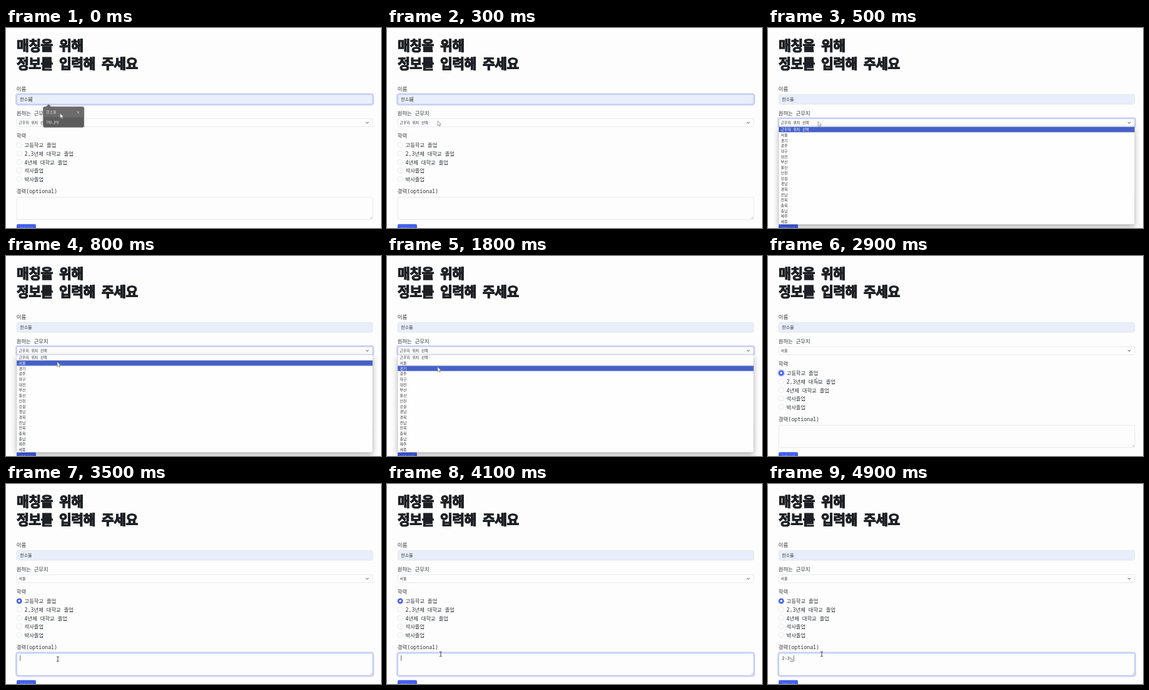
An HTML page for the animation above (5 s loop, 600 px wide and 321 px high).

```html
<!DOCTYPE html>
<html lang="ko">
<head>
<meta charset="utf-8">
<title>매칭 정보 입력</title>
<style>
  html, body { margin: 0; width: 100%; height: 100%; overflow: hidden; background: #fdfdfd; }
  svg { display: block; width: 100vw; height: 100vh; }
  text { font-family: "Noto Sans Mono", "Noto Sans CJK KR", "Noto Sans CJK", sans-serif; font-size: 8.3px; fill: #2f3337; white-space: pre; }
  .title { font: 900 21.6px "Noto Sans CJK KR", "Noto Sans CJK", sans-serif; letter-spacing: -.6px; word-spacing: 4.7px; fill: #1d2024; stroke: #1d2024; stroke-width: 1.2; }
  .mid { font-size: 7px; }
  .small { font-size: 5.9px; }
  .tip text { font: 5.8px "Noto Sans CJK KR", "Noto Sans CJK", sans-serif; fill: #dedede; }
  .field { fill: #fdfdfd; stroke: #e1e4e8; stroke-width: .8; }
  .auto { fill: #e8eefa; }
  .line { fill: none; stroke: #343a40; stroke-width: .9; }
  .ring { fill: none; stroke: #d0d8f8; stroke-width: 2.2; }
  .edge { fill: none; stroke: #adbbf2; stroke-width: .8; }
  .caret { stroke: #333; stroke-width: .7; }
  .list { fill: #fefefe; stroke: #cfd2d6; stroke-width: .5; filter: drop-shadow(0 4px 5px rgba(0, 0, 0, .3)); }

  /* Everything shares one 5 s clock; 2% is one 100 ms step. */
  .a { animation: 5s step-end infinite; }
  .tip { animation-name: tip; }
  .nameFocus { animation-name: nameFocus; }
  .menu { animation-name: menu; }
  .bar { animation-name: bar; fill: #4661c6; }
  .row0 { animation-name: row0; }
  .row1 { animation-name: row1; }
  .row2 { animation-name: row2; }
  .hint { animation-name: hint; }
  .city { animation-name: city; }
  .placeFocus { animation-name: placeFocus; }
  .checked { animation-name: checked; }
  .radioFocus { animation-name: radioFocus; }
  .noteFocus { animation-name: noteFocus; }
  .k1 { animation-name: k1; }
  .k2 { animation-name: k2; }
  .k3 { animation-name: k3; }
  .k4 { animation-name: k4; }
  .noteCaret { animation-name: noteCaret; }
  .arrow { animation-name: arrow; }
  .beam { animation-name: beam; }

  @keyframes tip { 0% { opacity: 1 } 2%, 100% { opacity: 0 } }
  @keyframes nameFocus { 0% { opacity: 1 } 8%, 100% { opacity: 0 } }
  @keyframes menu { 0% { opacity: 0 } 8% { opacity: 1 } 44%, 100% { opacity: 0 } }
  @keyframes bar {
    0% { transform: none } 16% { transform: translateY(8.7px) } 20% { transform: translateY(17.4px) }
    28% { transform: translateY(8.7px) } 36% { transform: translateY(17.4px) } 38%, 100% { transform: translateY(8.7px) }
  }
  @keyframes row0 { 0% { fill: #fff } 16%, 100% { fill: #2f3337 } }
  @keyframes row1 { 0% { fill: #2f3337 } 16% { fill: #fff } 20% { fill: #2f3337 } 28% { fill: #fff } 36% { fill: #2f3337 } 38%, 100% { fill: #fff } }
  @keyframes row2 { 0% { fill: #2f3337 } 20% { fill: #fff } 28% { fill: #2f3337 } 36% { fill: #fff } 38%, 100% { fill: #2f3337 } }
  @keyframes hint { 0% { opacity: 1 } 44%, 100% { opacity: 0 } }
  @keyframes city { 0% { opacity: 0 } 44%, 100% { opacity: 1 } }
  @keyframes placeFocus { 0% { opacity: 0 } 8% { opacity: 1 } 56%, 100% { opacity: 0 } }
  @keyframes checked { 0% { opacity: 0 } 56%, 100% { opacity: 1 } }
  @keyframes radioFocus { 0% { opacity: 0 } 56% { opacity: 1 } 68%, 100% { opacity: 0 } }
  @keyframes noteFocus { 0% { opacity: 0 } 68%, 100% { opacity: 1 } }
  @keyframes k1 { 0% { opacity: 0 } 86%, 100% { opacity: 1 } }
  @keyframes k2 { 0% { opacity: 0 } 90%, 100% { opacity: 1 } }
  @keyframes k3 { 0% { opacity: 0 } 92%, 100% { opacity: 1 } }
  @keyframes k4 { 0% { opacity: 0 } 96%, 100% { opacity: 1 } }
  @keyframes noteCaret {
    0% { transform: none } 86% { transform: translateX(4.2px) } 90% { transform: translateX(8.4px) }
    92% { transform: translateX(12.6px) } 96%, 100% { transform: translateX(18.6px) }
  }
  @keyframes arrow {
    0% { transform: translate(86.5px, 137px) }
    2% { transform: translate(86px, 139px) }
    4% { transform: translate(83px, 145px) }
    6% { transform: translate(81px, 149px) }
    8% { transform: translate(80px, 150px) }
    14% { transform: translate(81px, 160px) }
    16% { transform: translate(82px, 170px) }
    18% { transform: translate(82px, 174px) }
    20% { transform: translate(82px, 178px) }
    22% { transform: translate(82px, 180px) }
    28% { transform: translate(82px, 175px) }
    32% { transform: translate(82px, 173px) }
    36% { transform: translate(81px, 178px) }
    38% { transform: translate(80.5px, 174px) }
    46% { transform: translate(80px, 178px) }
    48% { transform: translate(78px, 183px) }
    50% { transform: translate(77px, 186px) }
    52% { transform: translate(77px, 187px) }
    58% { transform: translate(77px, 195px) }
    60% { transform: translate(78px, 215px) }
    62% { transform: translate(80px, 240px) }
    64% { transform: translate(82px, 263px); opacity: 1 }
    66%, 100% { transform: translate(83px, 276px); opacity: 0 }
  }
  @keyframes beam {
    0% { transform: translate(83px, 280px); opacity: 0 }
    66% { transform: translate(83px, 280px); opacity: 1 }
    68% { transform: translate(83px, 281px); opacity: 1 }
    72% { transform: translate(84px, 279px); opacity: 1 }
    74% { transform: translate(85px, 276px); opacity: 1 }
    76% { transform: translate(85.5px, 274px); opacity: 1 }
    78%, 100% { transform: translate(86px, 273px); opacity: 1 }
  }
</style>
</head>
<body>
<svg viewBox="0 0 600 321" preserveAspectRatio="none">
  <text class="title" x="17" y="36.2">매칭을 위해</text>
  <text class="title" x="17" y="64.7">정보를 입력해 주세요</text>

  <text x="16.8" y="100.7">이름</text>
  <rect class="field auto" x="17.2" y="106.7" width="569.6" height="15.6" rx="2.5"/>
  <g class="a nameFocus">
    <rect class="ring" x="16" y="105.5" width="572" height="18" rx="3.5"/>
    <rect class="edge" x="17.2" y="106.7" width="569.6" height="15.6" rx="2.5"/>
    <path class="caret" d="M41.3 110v9"/>
  </g>
  <text class="mid" x="22.2" y="117.4">한소율</text>

  <text x="16.8" y="139.6">원하는 근무지</text>
  <rect class="field" x="17.2" y="145.6" width="569.6" height="12.8" rx="2"/>
  <g class="a placeFocus">
    <rect class="ring" x="16" y="144.4" width="572" height="15.2" rx="3"/>
    <rect class="edge" x="17.2" y="145.6" width="569.6" height="12.8" rx="2"/>
  </g>
  <text class="small a hint" x="20.6" y="154.3">근무지 위치 선택</text>
  <text class="small a city" x="20.6" y="154.3">서울</text>
  <path class="line" d="M575.8 150.9l2.2 2.2 2.2-2.2"/>

  <text x="16.8" y="175.5">학력</text>
  <g id="levels"></g>
  <g class="a radioFocus"><circle class="ring" cx="21.2" cy="187.8" r="5.2"/></g>
  <g class="a checked">
    <circle cx="21.2" cy="187.8" r="4.4" fill="#4361ee"/>
    <circle cx="21.2" cy="187.8" r="1.8" fill="#fff"/>
  </g>

  <text x="16.8" y="265.4">경력</text>
  <text x="32.3" y="265">(optional)</text>
  <rect class="field" x="17.2" y="271.6" width="569.6" height="35.8" rx="2.5"/>
  <path d="M582.8 306l3-3M584.6 306l1.2-1.2" stroke="#888" stroke-width=".5"/>
  <g class="a noteFocus">
    <rect class="ring" x="16" y="270.4" width="572" height="38.2" rx="3.5"/>
    <rect class="edge" x="17.2" y="271.6" width="569.6" height="35.8" rx="2.5"/>
    <path class="caret a noteCaret" d="M22.7 275v9"/>
  </g>
  <text class="mid a k1" x="22.3" y="282.4">2</text>
  <text class="mid a k2" x="26.5" y="282.4">-</text>
  <text class="mid a k3" x="30.7" y="282.4">3</text>
  <g class="a k4">
    <text class="mid" x="34.9" y="282.4">ㄴ</text>
    <path class="caret" d="M35.2 284.3h5.8"/>
  </g>

  <rect x="17" y="314.8" width="31" height="17" rx="2.2" fill="#4361ee"/>
  <text class="small" x="21.7" y="325.2" style="fill:#d5dcfb">제출하기</text>

  <g class="a menu">
    <rect class="list" x="17.2" y="158.6" width="569.4" height="156.4" rx="1.5"/>
    <rect class="a bar" x="17.2" y="158.8" width="569.4" height="8.5"/>
    <g id="places"></g>
  </g>

  <g class="a tip">
    <g style="filter:drop-shadow(0 .5px 1px rgba(0,0,0,.25))">
      <path d="M64 126.8l4.2-4.2 4.2 4.2z" fill="#626262"/>
      <rect x="59.5" y="126.4" width="65.3" height="33" rx="2.2" fill="#5c5c5c"/>
    </g>
    <path d="M59.5 143.3v-14.7a2.2 2.2 0 0 1 2.2-2.2h60.9a2.2 2.2 0 0 1 2.2 2.2v14.7z" fill="#6b6b6b"/>
    <text x="64.6" y="137.2">한소율</text>
    <text x="64.6" y="152.7">tap_joy</text>
    <path d="M113.6 133.6l3.6 3.6m0-3.6l-3.6 3.6" stroke="#e6e6e6" stroke-width=".7"/>
  </g>

  <path class="a arrow" d="M0 0v7.6l1.8-1.6 1.2 2.7 1.3-.6-1.2-2.6h2.4z" fill="#fff" stroke="#666" stroke-width=".6" stroke-linejoin="round"/>
  <path class="a beam" d="M-2-3.8q2 0 2 1v5.6q0 1-2 1M2-3.8q-2 0-2 1M0 2.8q0 1 2 1" fill="none" stroke="#333" stroke-width=".9"/>
</svg>
<script>
  const levels = ["고등학교 졸업", "2,3년제 대학교 졸업", "4년제 대학교 졸업", "석사졸업", "박사졸업"];
  const places = ("근무지 위치 선택,서울,경기,광주,대구,대전,부산,울산,인천," +
    "강원,경남,경북,전남,전북,충북,충남,제주,세종").split(",");
  const fill = (id, items, draw) => {
    document.getElementById(id).innerHTML = items.map(draw).join("");
  };

  fill("levels", levels, (label, i) => {
    const y = 187.8 + 13.6 * i;
    return `<circle class="field" cx="21.2" cy="${y}" r="4.1"/><text x="29.6" y="${y + 3.6}">${label}</text>`;
  });
  fill("places", places, (label, i) => {
    const lit = i < 3 ? ` a row${i}` : "";
    return `<text class="small${lit}" x="20.6" y="${165.2 + 8.7 * i}">${label}</text>`;
  });
</script>
</body>
</html>
```
